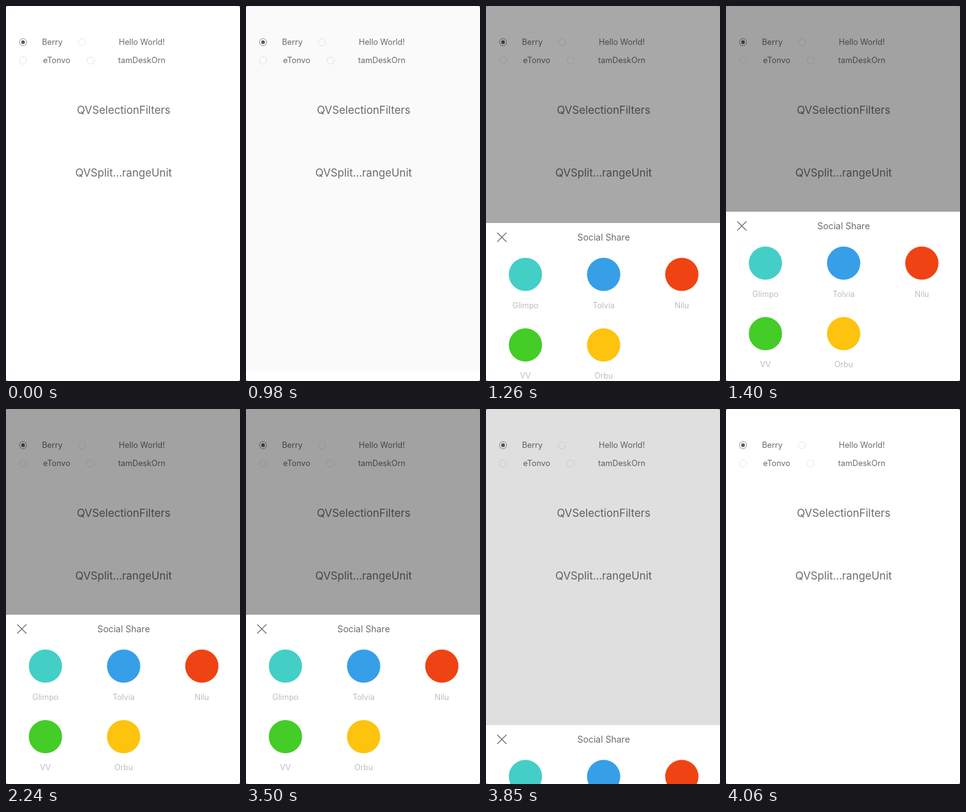
Animation, 374 px wide and 598 px high, one loop 4.34 s. Source, as an HTML page with a canvas:

```html
<!DOCTYPE html>
<html lang="en">
<head>
<meta charset="utf-8">
<title>Share sheet</title>
<style>
html, body { margin: 0; width: 100%; height: 100%; overflow: hidden; background: #fff; }
canvas { display: block; width: 374px; height: 598px; }
</style>
</head>
<body>
<canvas id="stage"></canvas>
<script>
const W = 374, H = 598, LOOP = 4340, STEP = 70;
const SHEET = 270, SLIDE = 400, OPEN_AT = 923, CLOSE_AT = 3609, DIM = 0.365;
const INK = '#6c6c6c', RING = '#e6e6e6', LABEL = '#bdbdbd';

const apps = [
  ['Glimpo', '#43cfc5'],
  ['Tolvia', '#369fe8'],
  ['Nilu', '#f04313'],
  ['VV', '#44cc27'],
  ['Orbu', '#fdc30f']
];

const canvas = document.getElementById('stage');
const ctx = canvas.getContext('2d');
const dpr = window.devicePixelRatio || 1;
canvas.width = W * dpr;
canvas.height = H * dpr;
ctx.scale(dpr, dpr);

// y is the middle of the capital letters
function text(str, x, y, size, color) {
  ctx.font = `${size}px Inter, Roboto, sans-serif`;
  ctx.textAlign = 'center';
  ctx.textBaseline = 'alphabetic';
  ctx.fillStyle = color;
  ctx.fillText(str, x, y + size * 0.364);
}

function disc(x, y, r, color) {
  ctx.beginPath();
  ctx.arc(x, y, r, 0, Math.PI * 2);
  ctx.fillStyle = color;
  ctx.fill();
}

function radio(x, y, on) {
  ctx.beginPath();
  ctx.arc(x, y, 5.7, 0, Math.PI * 2);
  ctx.strokeStyle = on ? '#909090' : RING;
  ctx.lineWidth = 1;
  ctx.stroke();
  if (on) disc(x, y, 2.9, '#5c5c5c');
}

function drawPage() {
  ctx.fillStyle = '#fff';
  ctx.fillRect(0, 0, W, H);
  radio(27.2, 57.7, true);
  radio(121.3, 57.7, false);
  radio(27.2, 87, false);
  radio(135.3, 87, false);
  text('Berry', 74, 57.7, 12.8, INK);
  text('Hello World!', 217, 57.7, 12.8, INK);
  text('eTonvo', 81, 86.7, 12.8, INK);
  text('tamDeskOrn', 217, 86.7, 12.8, INK);
  text('QVSelectionFilters', 188, 166, 17.2, INK);
  text('QVSplit...rangeUnit', 188, 266, 17.2, INK);
}

function drawSheet(top) {
  ctx.save();
  ctx.translate(0, top);
  ctx.fillStyle = '#fff';
  ctx.fillRect(0, 0, W, SHEET);

  ctx.beginPath();
  ctx.moveTo(18, 15.5);
  ctx.lineTo(32.6, 30);
  ctx.moveTo(32.6, 15.5);
  ctx.lineTo(18, 30);
  ctx.strokeStyle = '#666';
  ctx.lineWidth = 1.2;
  ctx.stroke();

  text('Social Share', 188, 23.2, 14.3, INK);
  apps.forEach(([name, color], i) => {
    const x = 63 + (i % 3) * 125;
    const y = 82 + Math.floor(i / 3) * 112.5;
    disc(x, y, 26.6, color);
    text(name, x, y + 49.2, 12.6, LABEL);
  });
  ctx.restore();
}

function drawCorners() {
  ctx.beginPath();
  ctx.rect(0, 0, W, H);
  ctx.roundRect(0, 0, W, H, 3.5);
  ctx.fillStyle = '#8a8a8a';
  ctx.fill('evenodd');
}

function ease(t) {
  const u = Math.min(1, Math.max(0, t / SLIDE));
  return u * u * (3 - 2 * u);
}

function draw(time) {
  const t = Math.floor((time % LOOP) / STEP) * STEP;
  const shown = ease(t - OPEN_AT) - ease(t - CLOSE_AT);
  drawPage();
  if (shown > 0) {
    ctx.fillStyle = `rgba(0, 0, 0, ${DIM * shown})`;
    ctx.fillRect(0, 0, W, H);
    drawSheet(Math.round(H - SHEET * shown));
  }
  drawCorners();
}

const start = performance.now();
function tick() {
  draw(performance.now() - start);
  requestAnimationFrame(tick);
}
tick();
</script>
</body>
</html>
```
